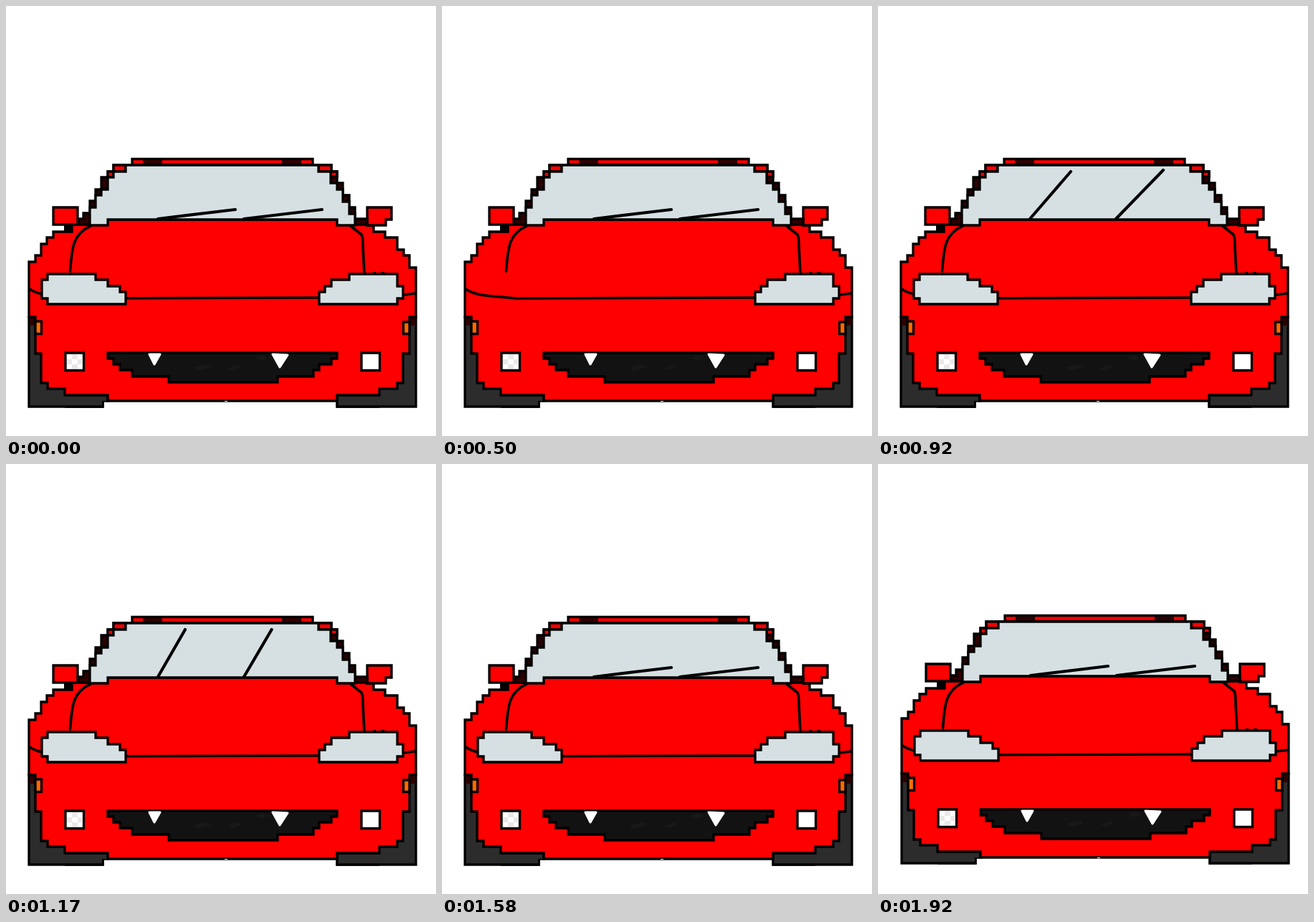
An HTML page that plays this animation: 600x600 px, repeating every 2 s.

```html
<!DOCTYPE html>
<html lang="en">
<head>
<meta charset="utf-8">
<title>Red car</title>
<style>
  html, body { margin: 0; width: 100%; height: 100%; overflow: hidden; background: #fff; }
  svg { display: block; width: 100vw; height: 100vh; }
  .ink { stroke: #000; stroke-width: 3.3; }
  .red { fill: #f00; }
  .dark { fill: #2e0000; }
  .glass { fill: #d6e0e2; }
  .tire { fill: #2c2c2c; }
  .lamp { fill: #ff6a00; }
  .white { fill: #fff; }
  .line { fill: none; stroke-linecap: round; stroke-width: 3.6; }
  #wipers { stroke-width: 4.2; }
</style>
</head>
<body>
<svg viewBox="0 0 600 600">
  <defs><clipPath id="lid"><rect id="opening" x="40" y="370" width="140" height="50"/></clipPath></defs>
  <g id="car">
    <!-- wheels -->
    <path class="ink tire" d="M32 434H84V551H135V559H32Z"/>
    <path class="ink tire" d="M572 434H519V551H462V559H572Z"/>
    <path class="ink tire" d="M82 543H142V551H135V559H82M521 543H462V559H521" stroke="none"/>
    <path class="dark" d="M33 434h8v12h-8zM563 434h8v12h-8z"/>
    <path class="tire" d="M80 545h60v6h-6v6h-54zM464 545h60v12h-60z"/>

    <!-- bodywork -->
    <path class="ink red" d="M66 315H92V305H504V306H513V315H529V323H546V340H555V348H563V365H572V434H563V458H563V485H554V526H546V534H521V543H462V551H142V543H82V534H58V526H49V485H41V434H32V357H41V348H49V332H57V323H66Z"/>
    <path class="ink red" d="M66 281H100V305H66Z"/>
    <path d="M81 306h11v9h-11z"/>
    <path class="ink red" d="M504 281H538V298H530V306H504Z"/>
    <path class="white" d="M305 551h4v1h-4z"/>

    <!-- cabin -->
    <path class="ink dark" d="M150 222H454V231H462V247H470V264H479V281H487V297H504V305H101V297H108V289H117V272H125V256H133V239H142V231H150Z"/>
    <path class="ink red" d="M150 222H167V231H150ZM142 231H150V239H142ZM436 222H454V231H436ZM453 231H462V238H453Z"/>
    <path class="ink red" d="M176 213.5H428V221.5H176Z"/>
    <path class="dark" d="M191 215h27v5h-27zM385 215h27v5h-27z"/>
    <path class="red" d="M142 300H462V309H142Z"/>
    <path class="ink glass" d="M167 222H436V231H453V247H462V256H470V273H479V290H487V306H462V298H142V306H117V281H125V264H133V256H142V239H150V231H167Z"/>
    <path id="wipers" class="ink line"/>

    <!-- bonnet -->
    <path class="ink line" d="M89.5 370C92 338 93 318 118 307M481 307L496 319Q498 322 498 335L500 374M33 395C50 406 70 404 103 408L437 407M555 403L571 401"/>

    <!-- lights -->
    <path class="ink glass" clip-path="url(#lid)" d="M58 374H125V382H142V391H159V399H167V416H58V408H50V382H58Z"/>
    <path class="ink glass" d="M479 374H546V391H554V408H546V416H437V399H445V391H454V382H479Z"/>
    <path d="M512 371h4v2h-4zM523 371h5v2h-5z"/>
    <path class="ink lamp" d="M41 440H49.5V457.5H41ZM554.5 441H563V457.5H554.5Z"/>
    <path class="ink white" d="M83 484H108.5V508.5H83ZM496 484H521.5V508.5H496Z"/>
    <path fill="#ebe8e8" d="M92 486h8v7h-8zM85 493h7v7h-7zM100 493h6v7h-6zM92 500h8v6h-8z"/>

    <!-- grille -->
    <path class="ink" fill="#121212" d="M142 484H462V492H454V500H437V508H429V517H379V525H227V517H176V508H159V500H150V492H142Z"/>
    <path fill="#181818" d="M262 504l18-4 6 4-20 5zM310 505l14-5 4 4-12 4zM348 491l10-4 8 4-10 4z"/>
    <path fill="#fff" stroke="#fff" stroke-width="3" stroke-linejoin="round" d="M200 486H215L207 500ZM372 486L393 487L382 504Z"/>
  </g>
</svg>
<script>
  const car = document.getElementById("car");
  const wipers = document.getElementById("wipers");
  const opening = document.getElementById("opening");

  // Each key: step, left tip x/y, right tip x/y.
  const sweep = [
    [8, 320, 284, 441, 284],
    [11, 269, 231, 398, 229],
    [13, 222, 228, 343, 228],
    [16, 306, 237, 426, 237],
    [19, 320, 284, 441, 284]
  ];
  const wink = { 2: 0.33, 3: 0.67, 4: 1, 5: 1, 6: 1, 7: 0.5 };
  const shake = { 22: [-1, -1], 23: [1, -2] };

  function wiperTips(step) {
    const next = sweep.findIndex(key => key[0] >= step);
    if (next < 1) return sweep[0].slice(1);
    const from = sweep[next - 1], to = sweep[next];
    const mix = (step - from[0]) / (to[0] - from[0]);
    return from.map((value, i) => value + (to[i] - value) * mix).slice(1);
  }

  function draw(now) {
    // Twelve steps per second, on a 10 ms clock.
    const step = Math.floor((Math.floor(now % 2000 / 10) + 0.4) * 0.12);
    const [lx, ly, rx, ry] = wiperTips(step);
    const [dx, dy] = shake[step] || [0, 0];
    const closed = 50 * (wink[step] || 0);

    wipers.setAttribute("d", `M212 297L${lx} ${ly}M332 297L${rx} ${ry}`);
    opening.setAttribute("y", 370 + closed);
    opening.setAttribute("height", 50 - closed);
    car.setAttribute("transform", `translate(${dx} ${dy})`);
    requestAnimationFrame(() => draw(performance.now()));
  }
  draw(performance.now());
</script>
</body>
</html>
```
